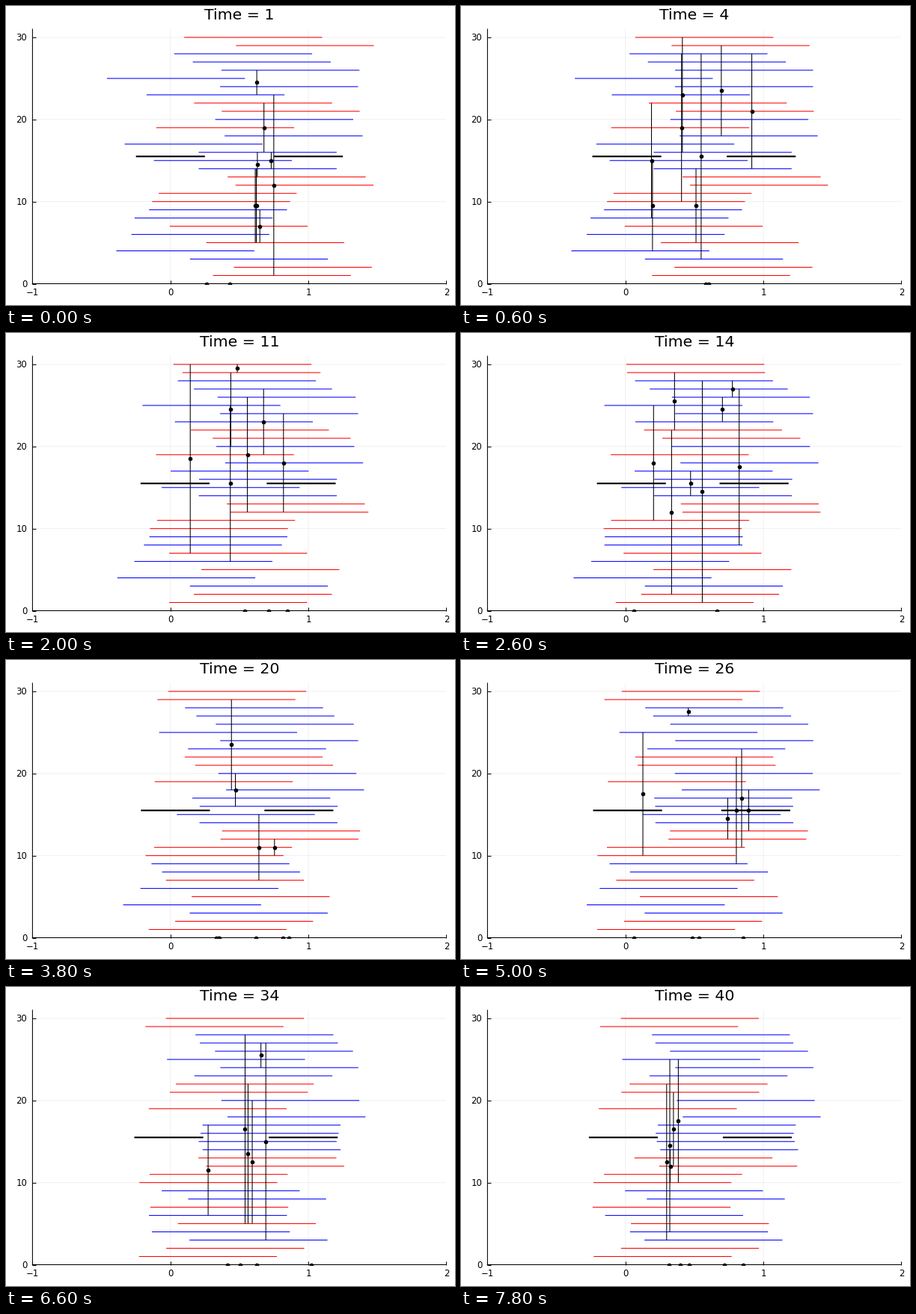
A matplotlib script for the animation above (8 s loop, 600 px wide and 400 px high).

```python
import numpy as np
import matplotlib.pyplot as plt
from matplotlib.animation import FuncAnimation
from matplotlib.collections import LineCollection

W, H, DPI = 600, 400, 100
STEPS, INTERVAL = 40, 200
LEFT, RIGHT, TOP, BOTTOM = 35.4, 588.4, 31, 371.5
PX = 72 / DPI  # points per pixel

# Agents 1 to 30: left end of each unit-wide interval, in thousandths.
START = np.array([308, 460, 142, -392, 260, -283, -5, -260, -155, -132,
                  -85, 472, 415, 205, -120, 205, -332, 393, -103, 325,
                  372, 172, -173, 360, -460, 370, 162, 27, 475, 100]) / 1000
END = np.array([-230, -32, 138, 33, 40, -147, -238, 155, -3, -232,
                -155, 245, 65, 252, 227, 220, 235, 415, -193, 372,
                -30, 30, 175, 362, -23, 323, 217, 192, -183, -33]) / 1000
AGENTS = np.arange(1, 31)
RED = np.isin(AGENTS, [1, 2, 5, 7, 10, 11, 12, 13, 19, 21, 22, 29, 30])
EARLY = np.isin(AGENTS, [1, 2, 17, 23, 25, 26, 29, 30])
LATE = np.isin(AGENTS, [4, 7, 9, 13, 14, 19])


def positions(time):
    """Left ends at a step: early, late or smooth drift from START to END."""
    u = (time - 1) / (STEPS - 1)
    ease = np.where(EARLY, 1 - (1 - u) ** 3,
                    np.where(LATE, u ** 3, u * u * (3 - 2 * u)))
    return START + (END - START) * ease


def bar_ends(time):
    keys = [1, 16, 34, STEPS]
    return (np.interp(time, keys, [-.25, -.2, -.262, -.265]),
            np.interp(time, keys, [.75, .672, .713, .706]))


def meetings(time, lefts):
    """Ten meetings of one step as (x, a, b); failed ones are (x, 0, 0)."""
    rng = np.random.default_rng(time)
    met = []
    for x in np.clip(rng.normal(.55, .22, 10), .06, 1.02):
        inside = AGENTS[(lefts <= x) & (x <= lefts + 1)]
        a, b = rng.choice(inside, 2, replace=False)
        met.append((x, 0, 0) if rng.random() < .3 else (x, a, b))
    return met


def spans(lefts, ys, width):
    return [[(x, y), (x + width, y)] for x, y in zip(lefts, ys)]


fig = plt.figure(figsize=(W / DPI, H / DPI), dpi=DPI, facecolor="white")
ax = fig.add_axes([LEFT / W, 1 - BOTTOM / H, (RIGHT - LEFT) / W,
                   (BOTTOM - TOP) / H])
ax.set_xlim(-1, 2)
ax.set_ylim(0, 31)
ax.set_xticks([-1, 0, 1, 2])
ax.set_yticks([0, 10, 20, 30])
ax.tick_params(labelbottom=False, labelleft=False, direction="in",
               length=5 * PX, width=PX)
ax.set_axisbelow(True)
ax.grid(color="#ededed", lw=.8 * PX)
for line in ax.get_xgridlines() + ax.get_ygridlines():
    line.set_snap(False)
for side, spine in ax.spines.items():
    spine.set_visible(side in ("left", "bottom"))
    spine.set_linewidth(1.05 * PX)
    spine.set_snap(False)


def label(x, y, text, size, ha="center"):
    return fig.text(x / W, 1 - y / H, text, fontsize=size * PX, ha=ha,
                    va="baseline", family="DejaVu Sans")


for v in (-1, 0, 1, 2):
    x = LEFT + (v + 1) * (RIGHT - LEFT) / 3
    label(x, 387.4, str(v).replace("-", "\u2212"), 11.6)
for v in (0, 10, 20, 30):
    y = BOTTOM - v * (BOTTOM - TOP) / 31
    label(28.2, y + 4.2, str(v), 11.6, "right")
title = label(312, 18.4, "", 20.5)


def strokes(color, width, z):
    lines = LineCollection([], colors=color, linewidths=width * PX, zorder=z,
                           capstyle="butt", snap=False)
    return ax.add_collection(lines, autolim=False)


reds = strokes("#ff0000", 1.05, 2)
blues = strokes("#0000ff", 1.05, 2)
bars = strokes("black", 2.1, 3)
links = strokes("black", 1.05, 4)
dots, = ax.plot([], [], "o", color="black", ms=5.6 * PX, mew=0, zorder=5,
                snap=False)


def draw(i):
    time = i + 1
    lefts = positions(time)
    title.set_text(f"Time = {time}")
    reds.set_segments(spans(lefts[RED], AGENTS[RED], 1))
    blues.set_segments(spans(lefts[~RED], AGENTS[~RED], 1))
    bars.set_segments(spans(bar_ends(time), (15.5, 15.5), .5))
    met = meetings(time, lefts)
    links.set_segments([[(x, a), (x, b)] for x, a, b in met if a])
    dots.set_data([x for x, a, b in met], [(a + b) / 2 for x, a, b in met])
    return title, reds, blues, bars, links, dots


anim = FuncAnimation(fig, draw, frames=STEPS, interval=INTERVAL,
                     init_func=lambda: draw(0), repeat=True, repeat_delay=0)
plt.show()
```
